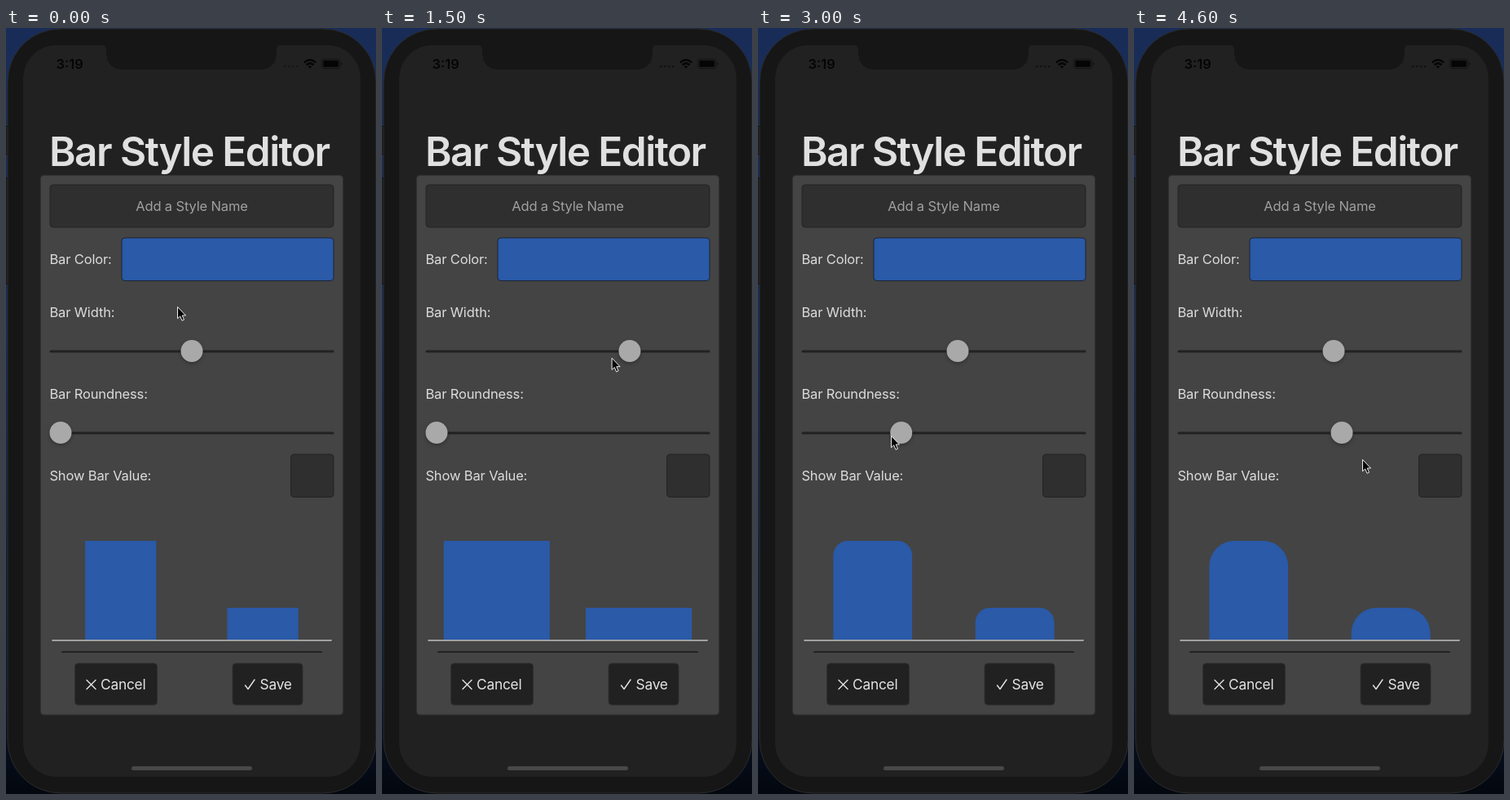
Recreate the animation shown at these times as an HTML page. Size 454 px wide and 938 px high, loop 4.7 s.

```html
<!DOCTYPE html>
<html lang="en">
<head>
<meta charset="utf-8">
<title>Bar Style Editor</title>
<style>
  html, body { margin: 0; width: 100%; height: 100%; overflow: hidden; background: #0b1630; }
  svg { display: block; width: 454px; height: 938px; }
  text { font: 16.5px Inter, Roboto, sans-serif; letter-spacing: -.14px; fill: #dcdcdc; }
  .title { font-size: 49.5px; font-weight: 600; letter-spacing: -1.55px; fill: #e0e0e0; }
  .clock { font-weight: 600; letter-spacing: 0; fill: #050505; }
  .hint { fill: #a0a0a0; text-anchor: middle; }
  .action { font-size: 17.3px; letter-spacing: -.2px; fill: #e4e4e4; }
  .field { fill: #2f2f2f; stroke: #222; }
  .button { fill: #212121; stroke: #2f2f2f; }
  .track { stroke: #222; stroke-width: 3; stroke-linecap: round; }
  .knob { fill: #a9a9a9; filter: drop-shadow(0 2px 2px rgba(0, 0, 0, .28)); }
  .bar { fill: #2a5aa8; }
  .icon { fill: none; stroke: #e4e4e4; stroke-width: 1.4; stroke-linecap: round; stroke-linejoin: round; }
</style>
</head>
<body>
<svg viewBox="0 0 454 938">
  <defs>
    <linearGradient id="desk" x1="0" y1="0" x2="0" y2="1">
      <stop offset="0" stop-color="#182c57"/>
      <stop offset=".4" stop-color="#172d59"/>
      <stop offset=".85" stop-color="#0b1934"/>
      <stop offset="1" stop-color="#03070e"/>
    </linearGradient>
  </defs>

  <!-- desktop and phone -->
  <rect width="454" height="938" fill="url(#desk)"/>
  <path d="M0 120h6v35h-6zM0 183h6v131h-6z" fill="#1b1b1d"/>
  <path d="M0 120.500h6M0 154.500h6M0 183.500h6M0 313h6" stroke="#080808"/>
  <rect x="2" y="1" width="452" height="936" rx="65" fill="#161616" stroke="#2b2b2d"/>
  <rect x="21" y="21" width="414" height="896" rx="41" fill="#212121"/>
  <path d="M117 20.500Q123 21 123 27V29Q123 51 145 51H310Q332 51 332 29V27Q332 21 338 20.500Z" fill="#161616"/>

  <!-- status bar -->
  <text class="clock" x="61.500" y="49.500">3:19</text>
  <g id="signal" fill="#111">
    <circle cx="342" cy="47" r="1.300"/><circle cx="347" cy="47" r="1.300"/>
    <circle cx="352" cy="47" r="1.300"/><circle cx="357" cy="47" r="1.300"/>
  </g>
  <g fill="none" stroke="#050505" stroke-width="2.300">
    <path d="M365.800 42.300Q373 35.700 380.200 42.300"/>
    <path d="M368.600 45.300Q373 41.300 377.400 45.300"/>
  </g>
  <path d="M370.700 47.200Q373 45.300 375.300 47.200L373 49.600Z" fill="#050505"/>
  <rect x="387.500" y="38" width="22.500" height="11.500" rx="3.500" fill="none" stroke="#121212"/>
  <rect x="389.200" y="39.700" width="19" height="8" rx="2" fill="#050505"/>
  <path d="M411.300 42v3.800q1.400-.6 1.400-1.900t-1.400-1.900" fill="#121212"/>

  <!-- form -->
  <text class="title" x="53" y="168.500">Bar Style Editor</text>
  <rect x="42.500" y="180.500" width="371" height="660.500" rx="4" fill="#444" stroke="#323232"/>
  <rect class="field" x="54" y="192" width="348" height="52" rx="4"/>
  <text class="hint" x="228" y="224">Add a Style Name</text>
  <text x="53.400" y="289">Bar Color:</text>
  <rect x="142" y="257" width="260" height="52.500" rx="4" fill="#2a5aa8" stroke="#1c2435"/>
  <text x="53.400" y="354">Bar Width:</text>
  <path class="track" d="M55 396H401"/>
  <circle class="knob" id="widthKnob" cy="395.500" r="13.500"/>
  <text x="53.400" y="454">Bar Roundness:</text>
  <path class="track" d="M55 496H401"/>
  <circle class="knob" id="roundKnob" cy="495.500" r="13.500"/>
  <text x="53.400" y="554">Show Bar Value:</text>
  <rect class="field" x="349.500" y="522" width="52.500" height="52.500" rx="4"/>

  <!-- chart -->
  <path class="bar" id="tallBar"/>
  <path class="bar" id="shortBar"/>
  <path d="M57 749.800H399" stroke="#adadad" stroke-width="1.800" stroke-linecap="round"/>
  <path d="M69 764H387" stroke="#222" stroke-width="2" stroke-linecap="round"/>

  <!-- actions -->
  <rect class="button" x="84.500" y="778" width="101" height="51" rx="4"/>
  <path class="icon" d="M99 798.500l11 11M110 798.500l-11 11"/>
  <text class="action" x="116" y="810">Cancel</text>
  <rect class="button" x="278" y="778" width="86" height="51" rx="4"/>
  <path class="icon" d="M293.500 805l3.500 4.500 8-11.500"/>
  <text class="action" x="311.500" y="810">Save</text>
  <rect x="154" y="904" width="148" height="5" rx="2.500" fill="#484848"/>

  <path id="cursor" d="M.5.500V14.800L3.700 11.900L6 17.300L8.500 16.200L6.200 11H10.500Z" fill="#050505" stroke="#eee" stroke-width="1" stroke-linejoin="round"/>
</svg>
<script>
  const LOOP = 4700, STEP = 100, BASE = 749.5, LEAD = .4;
  const el = id => document.getElementById(id);

  // Turning points [step, value]; every leg eases in and out.
  const swing = (...points) => n => {
    const i = points.findIndex(p => p[0] > n);
    if (i < 1) return points.at(i)[1];
    const [t0, a] = points[i - 1], [t1, b] = points[i];
    return a + (b - a) * (1 - Math.cos(Math.PI * (n - t0) / (t1 - t0))) / 2;
  };

  const widthX = swing([4, 228], [8, 303], [11, 216], [14, 335], [16.5, 245]);
  const roundX = swing([23, 67], [29.5, 182], [32.2, 106], [37.5, 345], [40, 275], [43, 387], [46, 255]);
  const freeX = swing([0, 210], [3, 228], [16, 245], [21.5, 84], [23, 67], [45, 267], [46, 280]);
  const cursorY = swing([0, 341], [3, 393], [16.5, 404], [21.5, 492], [30, 499], [46, 528]);

  // While dragging, the pointer runs slightly ahead of the knob.
  function cursorX(n) {
    if (n > 4 && n <= 16) return widthX(n + LEAD);
    if (n > 23 && n <= 45) return roundX(n + LEAD);
    return freeX(n);
  }

  function drawBar(id, center, top, width, radius) {
    const r = Math.min(radius, width / 2, BASE - top);
    const left = center - width / 2, right = center + width / 2;
    el(id).setAttribute("d", `M${left} ${BASE}V${top + r}A${r} ${r} 0 0 1 ${left + r} ${top}` +
      `H${right - r}A${r} ${r} 0 0 1 ${right} ${top + r}V${BASE}Z`);
  }

  function draw(n) {
    const width = 87.2 + (widthX(n) - 228) * .565, radius = (roundX(n) - 67) * .165;
    el("widthKnob").setAttribute("cx", widthX(n));
    el("roundKnob").setAttribute("cx", roundX(n));
    drawBar("tallBar", 140.75, 628, width, radius);
    drawBar("shortBar", 315.1, 710, width, radius);
    el("cursor").setAttribute("transform", `translate(${cursorX(n)} ${cursorY(n)})`);
    el("signal").setAttribute("opacity", n < 5 ? .6 : 1);
  }

  const start = performance.now();
  function tick() {
    draw(Math.floor((performance.now() - start) % LOOP / STEP));
    requestAnimationFrame(tick);
  }
  tick();
</script>
</body>
</html>
```
